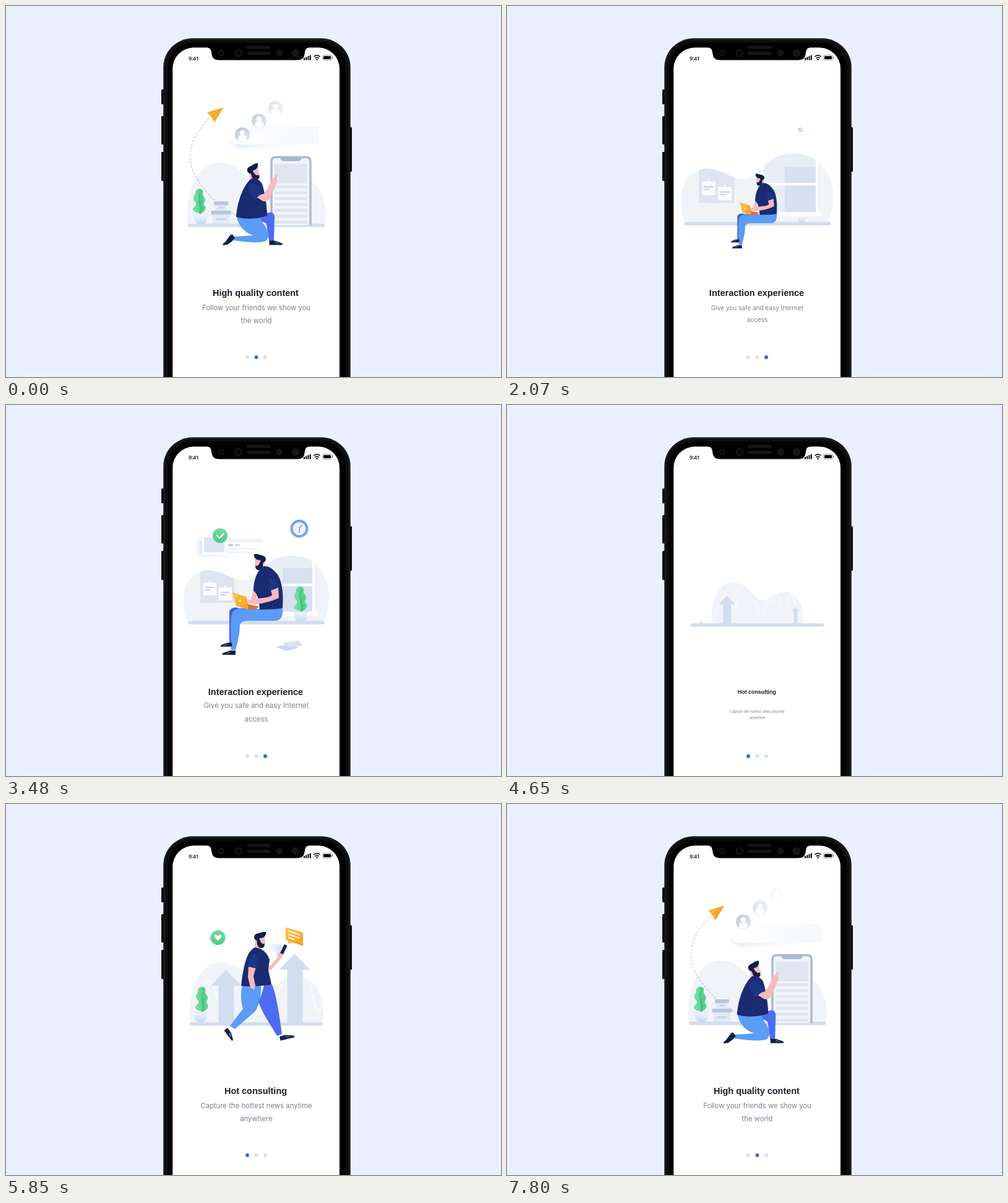
Write an HTML page that moves like this. It is 800x600 px and loops after 7830 ms.

```html
<!DOCTYPE html>
<html lang="en">
<head>
<meta charset="utf-8">
<title>Onboarding</title>
<style>
  html, body { margin: 0; width: 100%; height: 100%; overflow: hidden; background: #eaf0ff; }
  svg { display: block; width: 800px; height: 600px; }
  .title { font: bold 14.45px "Liberation Sans", Arial, sans-serif; fill: #1d1a33; text-anchor: middle; }
  .sub { font: 11.35px Inter, sans-serif; fill: #7f808e; text-anchor: middle; }
  .skin { fill: #f9b8bd; }
  .navy { fill: #1a2a70; }
  .ink { fill: #10204a; }
  .light { fill: #5c9bf6; }
  .royal { fill: #4d6cf0; }
  .pale { fill: #f0f4f8; }
  .steel { fill: #d2deef; }
</style>
</head>
<body>
<svg viewBox="0 0 800 600" xmlns="http://www.w3.org/2000/svg">
  <defs>
    <linearGradient id="potFill" x2="0" y2="1"><stop stop-color="#f4f8fe"/><stop offset="1" stop-color="#c5d6f3"/></linearGradient>
    <linearGradient id="leafFill"><stop stop-color="#78dfa9"/><stop offset=".5" stop-color="#62d795"/><stop offset=".5" stop-color="#4bcb87"/><stop offset="1" stop-color="#66d798"/></linearGradient>
    <linearGradient id="greenFill" x2="0" y2="1"><stop stop-color="#79daa2"/><stop offset="1" stop-color="#4fc987"/></linearGradient>
    <linearGradient id="avatarFill" x2="1" y2="1"><stop stop-color="#b9c5da"/><stop offset="1" stop-color="#dfe5ef"/></linearGradient>
    <linearGradient id="cardFill"><stop stop-color="#fff"/><stop offset="1" stop-color="#f6f8fc"/></linearGradient>
    <linearGradient id="fadeFill"><stop stop-color="#fff"/><stop offset="1" stop-color="#fff" stop-opacity="0"/></linearGradient>
    <linearGradient id="shadowFill"><stop stop-color="#d5e0f9"/><stop offset="1" stop-color="#eef3fd" stop-opacity="0"/></linearGradient>
    <linearGradient id="beamFill"><stop stop-color="#dce9ff" stop-opacity="0"/><stop offset="1" stop-color="#c7dbfa"/></linearGradient>
    <linearGradient id="goldFill" x2="1" y2="1"><stop stop-color="#ffc83d"/><stop offset="1" stop-color="#f79a26"/></linearGradient>
    <pattern id="speckle" width="11" height="9" patternUnits="userSpaceOnUse">
      <g fill="#4d73d2"><circle cx="2" cy="2" r=".45"/><circle cx="8" cy="4" r=".4"/><circle cx="4" cy="7" r=".35"/></g>
    </pattern>
    <filter id="soft" x="-20%" y="-60%" width="140%" height="220%"><feGaussianBlur stdDeviation="4"/></filter>
  </defs>
  <g id="phone">
    <g fill="#0a0a0b">
      <rect x="251" y="135" width="6" height="24" rx="1.5"/><rect x="251" y="178" width="6" height="46" rx="1.5"/>
      <rect x="251" y="236" width="6" height="47" rx="1.5"/><rect x="553" y="196" width="6" height="72" rx="1.5"/>
    </g>
    <rect x="254.300" y="52.300" width="302.400" height="650" rx="47" fill="#0e0e0f"/>
    <rect x="256" y="54" width="299" height="650" rx="45" fill="none" stroke="#2a2a2b"/>
    <rect x="262" y="59" width="287" height="650" rx="41" fill="#000"/>
    <rect x="269.300" y="67.300" width="269.700" height="650" rx="34" fill="#fff"/>
    <path d="M322 60V67C329 67 331 69 332 75C333 84 336 87.500 345 87.500H470C479 87.500 482 84 483 75C484 69 486 67 493 67V60Z"/>
    <g fill="#151516">
      <circle cx="348" cy="76" r="5"/><circle cx="376" cy="76" r="6.5"/><circle cx="442" cy="76" r="5.5"/><circle cx="468" cy="76" r="6.5"/>
      <rect x="389" y="64.500" width="39" height="5" rx="2.500"/><rect x="389" y="74" width="39" height="5" rx="2.500"/>
    </g>
    <g fill="#000"><circle cx="348" cy="76" r="2.500"/><circle cx="376" cy="76" r="3.500"/></g>
    <text x="295" y="88" font-size="9" font-weight="600" font-family="'Open Sans', sans-serif" letter-spacing="-.35" fill="#111">9:41</text>
    <path d="M481 84h2v3.500h-2zM484.200 82.500h2v5h-2zM487.500 81h2v6.500h-2zM490.800 79.500h2v8h-2z"/>
    <path d="M497.500 82Q502.500 77.500 507.500 82M499.500 84.500Q502.500 82 505.500 84.500" fill="none" stroke="#000" stroke-width="1.600"/>
    <circle cx="502.500" cy="86.500" r="1.200"/>
    <rect x="511.500" y="79.500" width="15" height="8" rx="2" fill="none" stroke="#777" stroke-width=".7"/>
    <rect x="513" y="81" width="12" height="5" rx="1"/><path d="M527.500 82v3" stroke="#777"/>
  </g>
  <g id="stage"></g>
  <g id="dots"></g>
</svg>
<script>
const LOOP = 7830, MID = 404.5;
const stage = document.getElementById('stage');
const dots = document.getElementById('dots');

// ---- drawing helpers ----
const path = (d, attrs = '') => `<path d="${d}" ${attrs}/>`;
const rect = (x, y, w, h, fill, rx = 0) => `<rect x="${x}" y="${y}" width="${w}" height="${h}" rx="${rx}" fill="${fill}"/>`;
const cls = name => `class="${name}"`;
const group = (transform, body) => `<g transform="${transform}">${body}</g>`;
const speckled = d => path(d, cls('navy')) + path(d, 'fill="url(#speckle)"');
const line = (d, color, width) => path(d, `fill="none" stroke="${color}" stroke-width="${width}" stroke-linecap="round" stroke-linejoin="round"`);

const ground = (x, y, w) => rect(x, y, w, 5.5, '#d2deef', 2.75);
const hills = path('M293 353C289 300 310 253 345 253C385 253 396 297 418 297C436 297 450 276 472 276C502 276 518 310 517 340L515 353Z', cls('pale'));
const pot = (x, y) => path(`M${x - 10} ${y}h21v5c0 7-4 12-8 12h-5c-4 0-8-5-8-12z`, 'fill="url(#potFill)"') + rect(x - 11, y, 23, 2, '#e3ebf7', 1);
const leaf = path('M1 0C-4-2-12-3-11-8C-10-11-5-13-6-17C-7-20-11-21-10-26C-9-30-7-30-7-34C-7-39-2-41 1-40C6-39 6-35 5-32C5-28 9-27 9-22C9-19 6-17 7-14C10-12 11-8 8-5C6-2 3-1 1 0Z', 'fill="url(#leafFill)"')
  + line('M1 0C6-10-4-20 0-31M3-7L6-11M0-17L4-21', '#2fa76a', .8);
const plant = (x, y) => group(`translate(${x} ${y})`, `<g class="sway">${leaf}</g>`);
const head = transform => group(transform,
  path('M3 13H10V29H1ZM6 8H18L19 19L8 23Z', cls('skin'))
  + path('M6 11C5 19 6 25 12 26C17 26 18 23 18 19C14 20 12 18 10 12Z', cls('ink'))
  + path('M1 9C1 1 9 3 14 0H20C21 6 17 10 10 10L9 14C5 15 2 13 1 9Z', cls('ink')));
const shoe = transform => group(transform, path('M0 0H9L20 4Q22 5 21 7H0Z', cls('ink')) + line('M9 2L11 4M12 3L14 5', '#fff', .6));
const avatar = (x, y) => `<g class="avatar" data-y="${y}"><circle cx="${x}" cy="${y}" r="12" fill="url(#avatarFill)"/>`
  + path(`M${x - 7} ${y + 9}c0-9 3-8 7-8s7-1 7 8q-7 5-14 0z`, 'fill="#fff"') + `<circle cx="${x}" cy="${y - 3}" r="4.300" fill="#fff"/></g>`;
const box = (x, y, w, h) => rect(x + 2.5, y, w - 5, h, '#e3e9f3') + rect(x, y, w, 6, '#b8c5da')
  + rect(x + 8, y + h * .58, w - 16, 3, '#c9d4e5');
const arrow = (x, tip) => path(`M${x} ${tip}L${x + 25} ${tip + 26}H${x + 13}V353H${x - 12}V${tip + 26}H${x - 25}Z`, cls('steel'));

// ---- artwork ----
const trail = 'M372 338C345 325 318 300 303 269C292 241 297 213 329 181';
const flight = `<mask id="trailMask" maskUnits="userSpaceOnUse" x="280" y="150" width="120" height="210">
  <path id="trailReveal" d="${trail}" pathLength="1" stroke-dasharray="1" fill="none" stroke="#fff" stroke-width="6"/></mask>
  <path id="trail" d="${trail}" mask="url(#trailMask)" fill="none" stroke="#adc1e6" stroke-width="1.100" stroke-dasharray="3.500 2.500"/>
  <g id="plane">${path('M325 172L351.500 164L337 188L332 180Z', 'fill="url(#goldFill)"') + line('M332 179L350 165M328 174L343 168M335 184L346 171', '#e08a1e', .7)}</g>`;

const bigPhone = rect(428.5, 244.500, 64, 110, '#f1f5fa', 8);
const phoneFrame = line('M429 353V251Q429 244.500 436 244.500H485Q492 244.500 492 251V353', '#a9b8cf', 3.4)
  + path('M443 244H478Q478 251 472 251H449Q443 251 443 244Z', 'fill="#a9b8cf"');
let feed = rect(434, 255, 53, 32, '#dfe6f1');
for (let y = 290; y < 350; y += 9.5) feed += rect(434, y, 53, 5, '#dfe6f1', 1.5);

const kneelingMan =
  path('M396 342C408 346 414 348 421 352L425 380H433L434 340C432 332 426 333 421 336Z', cls('royal'))
  + path('M373 341C376 358 389 368 400 371L369 373L368 379C388 382 410 384 420 380C427 374 424 361 416 353L411 341Z', cls('light'))
  + shoe('translate(425.500 379.500)')
  + path('M363 370L366 369.500L370 375L366 380L358 386L350.500 387Q350 384 354 382Z', cls('ink'))
  + head('translate(387 259) rotate(-14)')
  + speckled('M397 279C388 284 374 310 372 341C388 346 410 344 422 339C422 325 418 300 414 288C410 281 404 278 397 279Z')
  + path('M403 308L418 303L427 287Q427 281 432 279L437 272L439 273L437 279Q440 284 436 290L427 311Q423 317 416 316Z', cls('skin'))
  + path('M391 292C394 284 408 287 416 301L403 312Q393 308 391 292Z', 'fill="#1e3585"');

const chatCard = rect(365, 203, 120, 25, 'url(#shadowFill)', 13).replace('/>', ' filter="url(#soft)"/>')
  + path('M505 195V224H376C366 224 361 218 361 210C361 201 366 195 376 195Z', 'fill="url(#cardFill)"');

const room = 'M294 352C284 335 286 305 290 295C298 270 320 265 335 268C355 271 368 284 384 283C402 281 412 262 430 251C450 240 480 242 495 253C518 270 525 300 521 325C519 338 515 345 513 352Z';
const note = (x, y) => rect(x, y, 21, 21, '#fbfcfe') + line(`M${x + 10.5} ${y - 2}v5`, '#fff', 2)
  + line(`M${x + 3} ${y + 8}h14M${x + 3} ${y + 12}h8`, '#b4c3dc', 1.6);
const office = `<clipPath id="roomClip">${path(room)}</clipPath>${path(room, cls('pale'))}
  <g clip-path="url(#roomClip)">${rect(314, 260, 55, 60, '#dde5f1') + rect(413, 240, 83, 94, '#e8eef6') + rect(447, 264, 49, 70, '#d7e0ee')
  + rect(411, 240, 3, 94, '#fff') + rect(495, 240, 3.5, 94, '#fff') + rect(413, 289, 84, 4, '#fff')}</g>`
  + rect(410, 334, 94, 7, '#fbfcfe') + note(319, 287) + note(344, 295);

const sittingMan =
  path('M361 333C366 325 376 327 380 331L365 390H361Z', 'fill="#3d5fd6"')
  + path('M408 330L447 327C448 341 445 348 436 349H398C385 349 380 349 378 356C378 370 374 385 371 396H364C364 380 361 345 366 335C374 326 392 326 408 330Z', cls('light'))
  + shoe('translate(365 384.500) scale(-.85 .9)') + shoe('translate(371 397) scale(-1 1)')
  + head('translate(421 241) scale(-1 1)')
  + path('M401 295L408 302L402 321H394Z', cls('skin'))
  + speckled('M416 261C405 268 400 285 400 300L405 306C410 318 409 324 410 331C425 330 440 331 447 328C449 305 446 280 436 271C430 264 424 260 416 261Z')
  + path('M428 299L440 295L441 312C426 319 405 324 392 321L390 316C404 311 421 314 430 308Z', cls('skin'))
  + path('M425 281Q437 276 441 295L428 300Z', 'fill="#1e3585"')
  + path('M366 303L388 310L394 331L372 325Z', 'fill="url(#goldFill)"') + path('M390 322L409 326L404 330L392 331Z', 'fill="#e96b35"')
  + '<circle cx="378" cy="317" r="1.800" fill="#fff"/>';

const taskCard = rect(311, 217, 80, 26, 'url(#shadowFill)', 4).replace('/>', ' filter="url(#soft)"/>')
  + rect(317, 211, 104, 31, 'url(#fadeFill)', 2) + rect(320, 214, 33, 24, '#dde5f2')
  + rect(358, 216, 56, 6, '#f0f3f9') + rect(359, 225, 8, 3, '#bdcae1', 1.5) + rect(370, 225, 8, 3, '#d0d9e9', 1.5)
  + rect(359, 231.500, 49, 2.5, '#eef2f8') + rect(359, 237, 36, 2.5, '#eef2f8');
const badge = (x, y, mark) => `<circle cx="${x}" cy="${y}" r="12" fill="url(#greenFill)"/>${mark}`;
const clock = '<circle cx="474" cy="200" r="12.500" fill="#edf2fb" stroke="#6fa3f7" stroke-width="4"/>' + line('M474 206V199L478 194.500', '#8fa6d0', 1.8);
const papers = path('M436 391L455 387L474 392L453 398Z', 'fill="#cbd6eb"') + path('M447 385L472 381L480 389L457 392Z', 'fill="#dae3f2"');

const wave = line('M300 350C306 335 312 315 318 300C326 274 334 285 340 310C344 325 350 330 354 310C362 280 372 282 380 300C388 320 392 290 398 300C406 320 408 340 412 340C420 335 424 300 432 300C444 308 448 278 455 290C465 330 472 340 476 318C478 280 486 270 492 295C500 335 506 345 511 325', '#fff', 1.3);
const heart = path('M342.500 221.500L337.500 216.500C335 211 341 211 342.500 214.500C344 211 350 211 347.500 216.500Z', 'fill="#fff"');
const bubble = path('M453 200L478 208Q480 209 480 211V230L462 224L457 227L456 222L452 220V202Q452 200 453 200Z', 'fill="url(#goldFill)"')
  + line('M457 206L474 212M457 211.500L474 217.500M457 216.500L466 220', '#fff', 1.8);
const walkingMan =
  path('M382 293H412C413 310 409 325 403 335L370 364L362 359L383 331C379 318 379 305 382 293Z', cls('light'))
  + path('M417 292L430 292C437 310 441 335 446 372L438 375C426 355 414 337 408 320C412 312 415 303 417 292Z', cls('royal'))
  + shoe('translate(358 362) rotate(53)') + shoe('translate(442 376) rotate(-14) scale(1.1 1)')
  + path('M424 224L449 229L443 243L421 235Z', 'fill="url(#beamFill)"')
  + path('M418 257L427 262L438 249L439 242L446 238L449 243L443 251L430 267Q427 270 421 267Z', cls('skin'))
  + path('M450 227L454.500 229L448 243L443 241Z', cls('ink'))
  + head('translate(400 207)')
  + speckled('M402 232C390 238 384 258 380 294C396 296 415 294 429 292C427 280 424 272 424 266L426 252C422 240 414 233 402 232Z')
  + path('M392 262L404 264L400 278L403 294L401 300L395 297L391 280Z', cls('skin'))
  + path('M394 247Q403 236 406 249L405 266L391 263Z', 'fill="#1e3585"');

// ---- scenes: layers pop in after `at` ms around (ox, oy) ----
const layer = (at, ox, oy, art, extra = {}) => ({ at, ox, oy, art, dur: 500, ease: pop, ...extra });
const caption = (title, lines, y, titleTime, subTime) => [
  layer(titleTime[0], MID, 464, `<text class="title" x="403.500" y="469">${title}</text>`, { dur: titleTime[1], ease: cubicOut }),
  layer(subTime[0], MID, 504, lines.map((s, i) => `<text class="sub" x="${MID}" y="${y + i * 21.5}">${s}</text>`).join(''), { dur: subTime[1], ease: cubicOut })
];
const flat = { flat: true }, bob = { bob: .6 };

const scenes = [
  { start: 7090, end: 9570, dot: 1, color: '#2a70dc', layers: [
    layer(100, MID, 354, hills),
    layer(0, MID, 354, ground(293.5, 352, 221.5), flat),
    layer(300, MID, 354, flight, { flight: true, dur: 380 }),
    layer(52, 347.5, 352, box(331.5, 331, 32, 21)),
    layer(160, 347.5, 331, box(336, 316, 23, 15)),
    layer(173, 314, 353, pot(314, 336)),
    layer(240, 314, 336, plant(313, 336)),
    layer(220, 460.5, 353, bigPhone + feed),
    layer(150, 460.5, 353, phoneFrame),
    layer(280, 361, 210, chatCard),
    layer(250, MID, 358, kneelingMan),
    layer(420, 409, 186, avatar(382, 208) + avatar(409, 186) + avatar(435.5, 165.5), { avatars: true }),
    ...caption('High quality content', ['Follow your friends we show you', 'the world'], 492, [20, 500], [36, 823])
  ] },
  { start: 1740, end: 4450, dot: 2, color: '#2f62ee', layers: [
    layer(100, MID, 354, office),
    layer(0, MID, 352, ground(294, 349.25, 221), flat),
    layer(255, 476.5, 350, pot(476, 334)),
    layer(360, 477, 334, plant(477, 334)),
    layer(400, 369, 227, taskCard),
    layer(450, 346, 211, badge(346, 211.5, line('M341 211.500L345 215.500L352 208', '#fff', 2.2)), bob),
    layer(305, 474, 200, clock),
    layer(400, 458, 390, papers),
    layer(218, MID, 358, sittingMan),
    ...caption('Interaction experience', ['Give you safe and easy Internet', 'access'], 490, [0, 360], [0, 650])
  ] },
  { start: 4450, end: 7090, dot: 0, color: '#2f62ee', layers: [
    layer(100, MID, 354, group('translate(14.600 9) scale(.964 .975)', hills) + wave),
    layer(0, MID, 354, ground(297, 353, 215), flat),
    layer(130, 355.5, 353, arrow(355.5, 268)),
    layer(173, 466.5, 353, arrow(466.5, 242)),
    layer(173, 314, 353, pot(314, 336)),
    layer(290, 316, 336, plant(317, 336)),
    layer(380, 342.5, 216.5, badge(342.5, 216.5, heart), bob),
    layer(430, 466, 215, bubble, bob),
    layer(230, MID, 358, walkingMan),
    ...caption('Hot consulting', ['Capture the hottest news anytime', 'anywhere'], 491.5, [65, 500], [36, 823])
  ] }
];

// ---- timing ----
function clamp(x) { return Math.min(1, Math.max(0, x)); }
function ramp(t, from, to) { return clamp((t - from) / (to - from)); }
function cubicOut(u) { return 1 - (1 - u) ** 3; }
function pop(u) { const v = u - 1; return 1 + v * v * (2.5 * v + 1.5); }

for (const scene of scenes) {
  scene.node = stage.appendChild(document.createElementNS(stage.namespaceURI, 'g'));
  scene.node.innerHTML = scene.layers.map(l => `<g>${l.art}</g>`).join('');
  scene.layers.forEach((l, i) => l.node = scene.node.children[i]);
}
dots.innerHTML = [390, 404.5, 419].map(x => `<circle cx="${x}" cy="568" r="2.900"/>`).join('');

const route = document.getElementById('trail');
const reveal = document.getElementById('trailReveal');
const plane = document.getElementById('plane');
const avatars = [...document.querySelectorAll('.avatar')];
const leaves = [...document.querySelectorAll('.sway')];
const routeLength = route.getTotalLength();
const routeEnd = route.getPointAtLength(routeLength);

function fly(p) {
  const at = route.getPointAtLength(routeLength * p);
  reveal.setAttribute('stroke-dashoffset', 1 - p);
  plane.setAttribute('transform', `translate(${at.x - routeEnd.x} ${at.y - routeEnd.y}) translate(329 181) scale(${clamp(p * 3)}) translate(-329 -181)`);
  route.parentNode.style.display = p > 0 ? '' : 'none';
}

// Avatars slide down and grow more solid the lower they are.
function dropAvatars(t) {
  const lift = 21.5 * (1 - ramp(t, 705, 738));
  for (const a of avatars) {
    a.setAttribute('transform', `translate(0 ${-lift})`);
    a.setAttribute('opacity', ramp(t, 560, 700) * ramp(a.dataset.y - lift, 143, 195));
  }
}

function drawScene(scene, time) {
  const t = (time - scene.start + LOOP) % LOOP, life = scene.end - scene.start;
  const shown = t < life;
  scene.node.style.display = shown ? '' : 'none';
  if (!shown) return;
  dots.childNodes.forEach((d, i) => d.setAttribute('fill', i === scene.dot ? scene.color : '#d0e1f6'));
  for (const l of scene.layers) {
    const leave = life - l.at * .3;
    const out = 1 - ramp(t, leave - 240, leave) ** 3;
    const u = clamp((t - l.at) / l.dur);
    if (l.flight) { fly(cubicOut(u) * out); continue; }
    if (l.avatars) dropAvatars(t);
    const s = (l.avatars ? 1 : l.ease(u)) * out;
    const dy = l.bob ? l.bob * Math.sin(t / 300) : 0;
    l.node.style.display = s > .002 ? '' : 'none';
    l.node.setAttribute('transform', `translate(${l.ox} ${l.oy + dy}) scale(${s} ${l.flat ? 1 : s}) translate(${-l.ox} ${-l.oy})`);
  }
}

function render(time) {
  scenes.forEach(scene => drawScene(scene, time));
  const angle = 2.5 * Math.sin(time / LOOP * Math.PI * 12);
  leaves.forEach(l => l.setAttribute('transform', `rotate(${angle})`));
}

const begin = performance.now();
function tick() {
  render((performance.now() - begin) % LOOP);
  requestAnimationFrame(tick);
}
tick();
</script>
</body>
</html>
```
